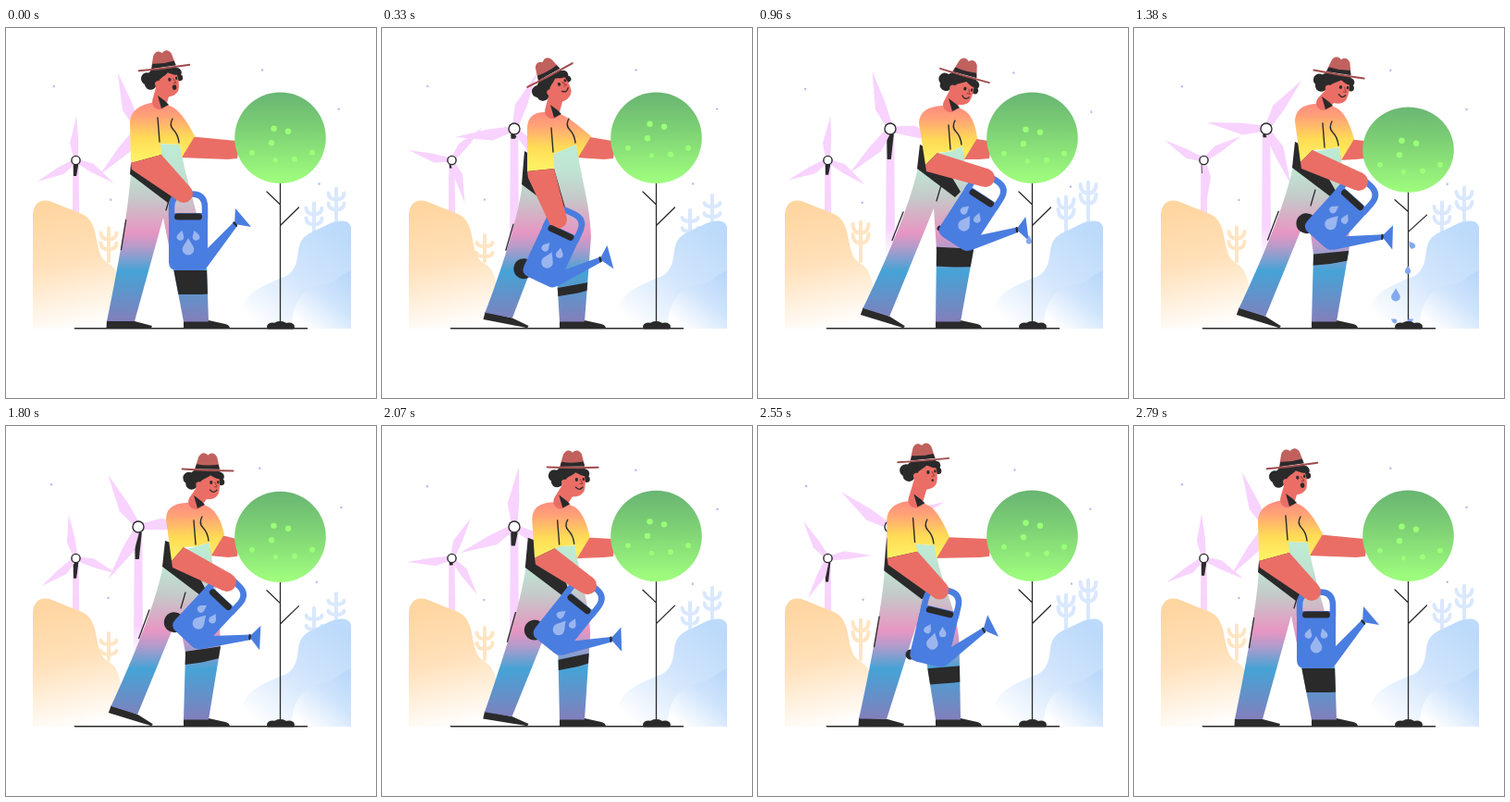
Recreate the animation shown at these times as an HTML page with a canvas. Size 400 by 400 pixels, loop 2820 ms.

```html
<!DOCTYPE html>
<html lang="en">
<head>
<meta charset="utf-8">
<title>Watering a tree</title>
<style>
html, body { margin: 0; height: 100%; overflow: hidden; background: #fff; }
canvas { display: block; width: 400px; height: 400px; }
</style>
</head>
<body>
<canvas id="stage" width="400" height="400"></canvas>
<script>
const c = document.getElementById('stage').getContext('2d');
const LOOP = 2820, STEP = 30, TAU = Math.PI * 2, RAD = Math.PI / 180;
const DARK = '#2a2a2b', SKIN = '#ea6e66', BLUE = '#4a7de0', MILL = '#f8d3ff';

// Pose times; each track returns to its first value at the last one.
const KEYS = [0, 330, 960, 1380, 1800, 2310, 2790];
const points = {
  neck: [168,82, 186,92, 210,85, 207,83, 207,84, 181,83],
  shoulder: [134,91, 157,97, 174,91, 174,89, 173,89, 149,89],
  elbow: [135,146, 157,155, 181,148, 180,145, 179,146, 149,140],
  inner: [168,137, 186,152, 194,135, 193,132, 192,131, 180,134],
  hand: [192,179, 190,207, 246,162, 243,166, 239,169, 205,175],
  farElbow: [197,128, 219,128, 230,130, 231,131, 229,128, 206,134],
  bib: [167,125, 186,136, 209,133, 207,131, 206,130, 178,130],
  hip: [135,156, 152,167, 173,150, 172,149, 170,150, 142,152],
  crotch: [170,205, 176,222, 190,195, 188,200, 186,205, 174,225],
  frontKnee: [217,258, 226,226, 233,240, 233,236, 232,238, 219,213],
  backKnee: [181,260, 189,268, 193,240, 194,245, 194,245, 186,255],
  hat: [171,43, 181.5,51, 223.5,51.5, 221.5,50, 218,47.5, 192,43],
  can: [197,231, 182,246, 227,206.5, 218,206, 213.5,207.5, 183.5,221]
};
const values = {
  headTurn: [-8, -29, 15, 8.5, 1, -2],
  canTurn: [0, 25, 33, 42, 43, 31],
  footTurn: [0, 11, 17, 17, 17, 2],
  patchL: [262, 283, 236, 246, 246, 263],
  patchR: [262, 272, 239, 240, 237, 250],
  patchH: [26, 9, 21, 12, 14, 9],
  cuff: [0, 11, 3, 11, 11, 11],
  bob: [0, 0, 0, 12.5, 1, 0],
  fruit: [0, -5, 1, 0, -2, -8],
  gasp: [1, 0, 0, 0, 0, 0]
};

// Monotone cubic through the keyed values.
function at(track, t) {
  const v = [...track, track[0]];
  if (t >= KEYS[6]) return v[6];
  const slope = i => (v[i + 1] - v[i]) / (KEYS[i + 1] - KEYS[i]);
  const tangent = i => {
    if (i === 0 || i === 6) return 0;
    const a = slope(i - 1), b = slope(i);
    return a * b <= 0 ? 0 : 2 * a * b / (a + b);
  };
  const i = KEYS.findIndex((k, n) => t < KEYS[n + 1]);
  const h = KEYS[i + 1] - KEYS[i], u = (t - KEYS[i]) / h, w = 1 - u;
  return v[i] * (1 + 2 * u) * w * w + v[i + 1] * u * u * (3 - 2 * u)
    + h * (tangent(i) * u * w * w - tangent(i + 1) * u * u * w);
}

function poseAt(t) {
  const p = {};
  for (const k in points)
    p[k] = [0, 1].map(d => at(points[k].filter((_, i) => i % 2 === d), t));
  for (const k in values) p[k] = at(values[k], t);
  if (t > 2310 && t < 2790) p.hat[1] -= 6 * Math.sin((t - 2310) / 480 * Math.PI) ** 2;
  return p;
}

const off = (p, x, y) => [p[0] + x, p[1] + y];
function fade(x0, y0, x1, y1, ...stops) {
  const g = c.createLinearGradient(x0, y0, x1, y1);
  for (let i = 0; i < stops.length; i += 2) g.addColorStop(stops[i], stops[i + 1]);
  return g;
}
function fill(color, d) { c.fillStyle = color; c.fill(new Path2D(d)); }
function line(color, width, d) {
  c.strokeStyle = color;
  c.lineWidth = width;
  c.stroke(new Path2D(d));
}
const poly = (color, ...pts) => fill(color, 'M' + pts.join('L') + 'Z');
function dot(color, x, y, r, ry = r) {
  c.fillStyle = color;
  c.beginPath();
  c.ellipse(x, y, r, ry, 0, 0, TAU);
  c.fill();
}
function within(x, y, deg, draw) {
  c.save();
  c.translate(x, y);
  c.rotate(deg * RAD);
  draw();
  c.restore();
}
function drop(color, x, y, s, deg = 0) {
  within(x, y, deg, () => fill(color,
    `M0 ${-s}C${s * .3} ${-s * .4} ${s * .7} 0 ${s * .7} ${s * .35}` +
    `A${s * .7} ${s * .7} 0 0 1 ${-s * .7} ${s * .35}C${-s * .7} 0 ${-s * .3} ${-s * .4} 0 ${-s}Z`));
}

function windmill(x, y, len, phase, bottom, hub) {
  const w = len * .065;
  poly(fade(0, y, 0, bottom, 0, MILL, .75, MILL, 1, '#f8d3ff00'),
    [x - w, y], [x + w, y], [x + w * 1.2, bottom], [x - w * 1.2, bottom]);
  const shade = len / 65 * (16 + 13 * Math.cos((phase - 92) * 3 * RAD));
  poly(DARK, [x - w * .9, y + hub], [x + w * .9, y + hub],
    [x + w * .2, y + hub + shade], [x - w * .8, y + hub + shade]);
  for (let k = 0; k < 3; k++) within(x, y, phase + k * 120, () => fill(MILL,
    `M${len * .05} 0L${len * .05} ${-len * .45}L0 ${-len}L${-len * .14} ${-len * .38}L${-len * .04} 0Z`));
  dot(DARK, x, y, hub + .7);
  dot('#fff', x, y, hub - .7);
}

function plant(color, x, low, bottom, open) {
  const top = low - 15 * open;
  line(color, 4, `M${x} ${bottom}V${top}`);
  for (const y of [top + 9, top + 20]) for (const s of [-1, 1])
    line(color, 4, `M${x} ${y + 3}Q${x + s * 8} ${y + 3} ${x + s * 8.5} ${y - 1 - 6 * open}`);
}

function scenery(t) {
  const a = t / 1410 * TAU, open = .5 - .5 * Math.sin(a), spin = t / LOOP * 360;
  const r = 1.8, dx = r * Math.cos(-.8 - a), dy = r * Math.sin(-.8 - a);
  for (const [x, y, m] of [[50.5, 64.3, 1], [275.8, 46.8, 1], [361, 89, -1], [337.3, 169.8, 1], [112, 187, 1]])
    dot('#aebff0', x + m * dx, y + dy, 1.2);

  windmill(143, 109, 65, spin - 20, 250, 6);
  windmill(75.5, 143, 48, spin + 1, 215, 4.6);

  plant('#ffe5c3', 111, 224, 252, open);
  plant('#d9e8fd', 333, 197, 225, open);
  plant('#d9e8fd', 357, 181, 214, open);
  fill(fade(55, 190, 85, 325, 0, '#ffd5a0', .45, '#ffe0b8', 1, '#fff'),
    'M29 325V203C29 188 40 183 52 189L82 201C102 210 94 236 106 251C116 259 122 258 126 290L130 325Z');
  fill(fade(360, 220, 275, 325, 0, '#bcdafb', .5, '#d3e6fc', 1, '#fff'),
    'M373 325V216C372 207 361 207 351 211L328 222C308 233 323 252 305 267C282 278 263 281 254 305L246 325Z');
  fill(fade(372, 268, 325, 325, 0, '#b9d8fb', .45, '#cfe4fc', 1, '#fff'),
    'M373 325V262C361 266 357 275 343 278C322 282 311 292 308 325Z');
}

function tree(p) {
  const b = p.bob, y = 118.8 + b * 1.03;
  line(DARK, 1.3, `M296.5 ${150 + b * .85}V320M296.5 ${191 + b * .6}L282 ${177 + b * .7}` +
    `M296.5 ${213.5 + b * .55}L316.5 ${194 + b * .65}`);
  dot(fade(0, y - 49, 0, y + 49, 0, '#69b573', .4, '#7dd074', 1, '#a0ff7e'),
    296.5, y, 49.3, 49.3 - b * .25);
  for (const [dx, dy, r] of [[-7, -10, 3.2], [8.5, -7, 3.2], [-9.5, 5.5, 3.2],
    [-30.5, 16, 2.8], [-5, 24, 2.6], [15.5, 23, 3], [34.5, 16, 3]])
    dot('#9bff78', 296.5 + dx, y + dy + p.fruit, r);
}

function ground() {
  dot(DARK, 288, 323, 6, 4.5);
  dot(DARK, 296.5, 322, 8, 5);
  dot(DARK, 306, 323, 6, 4.5);
  fill('#fff', 'M278 325.5H316V330H278Z');
  line(DARK, 1.6, 'M74.5 324.7H325.5');
}

function head(p) {
  within(...p.hat, p.headTurn, () => {
    for (const [x, y, r] of [[-20, 9, 6.5], [-17, 15, 6.5], [-11, 8, 8], [13, 7, 5], [15, 13, 3.5]])
      dot(DARK, x, y, r);
    fill(SKIN, 'M-11 6H12C14 13 14 20 12 26C8 33 -3 34 -9 27C-13 22 -13 12 -11 6Z');
    fill(DARK, 'M-14 0H13L15 9C10 11 7 7 3 6C-2 10 -7 10 -9 16C-15 15 -15 7 -14 0Z');
    dot(SKIN, -9, 16, 3);
    dot(DARK, 4, 13.5, 1.6, 2);
    dot(DARK, 11.5, 13, 1.2, 1.7);
    line('#9e3f42', 1, 'M8 13L10.5 18H7.5');
    if (p.gasp > .4) dot(DARK, 8, 22.5, 2.3 * p.gasp, 2.8 * p.gasp);
    else line(DARK, 1.3, 'M3 21.5Q7 26 10.5 21.5');
    fill('#c0615e', 'M-14 -1L-10 -14C-8 -18 -4 -20 0 -16C4 -20 8 -18 10 -14L13 -1Z');
    fill(DARK, 'M-13.5 -1L-12 -6Q0 -4 11.5 -6L13 -1Z');
    line('#a04c4c', 2, 'M-27.5 -.5Q0 1 27.5 .5');
  });
}

function trousers(p) {
  const turn = p.footTurn * RAD, cos = Math.cos(turn), sin = Math.sin(turn);
  const foot = (x, y) => [158 + x * cos - y * sin, 325 + x * sin + y * cos];
  const heel = foot(-49, -8), ankle = foot(-19, -8), [hx, hy] = p.hip;
  const bibR = off(p.farElbow, -9, -2);
  poly(DARK, foot(-49, -9), foot(-49.5, -.5), foot(-1, -.5), foot(0, -3), ankle);
  fill(DARK, 'M192 316V325H242Q242 321 237 320L219 316Z');

  const shape = new Path2D(`M${p.bib}L${hx + 8} ${hy - 12}L${p.hip}` +
    `Q${hx * .8 + heel[0] * .2 + 2} ${hy + 50} ${heel}L${ankle}L${p.crotch}` +
    `L${p.backKnee}L192 317.5H219L${p.frontKnee}` +
    `C${off(p.frontKnee, -1, -35)} ${off(bibR, 6, 40)} ${bibR}Z`);
  c.fillStyle = fade(0, 130, 0, 320, 0, '#bdebd4', .14, '#c0e2d2', .28, '#c5c9c9',
    .48, '#e796c2', .56, '#b79bca', .7, '#45a3d6', 1, '#857dba');
  c.fill(shape);
  c.save();
  c.clip(shape);
  poly(DARK, [179, p.patchL], [240, p.patchR], [240, p.patchR + p.patchH - 2],
    [212, (p.patchL + p.patchR) / 2 + p.patchH], [179, p.patchL + p.patchH]);
  c.restore();

  const seam = u => [hx + (heel[0] - hx) * u + 3, hy + (heel[1] - hy) * u];
  line(DARK, 1.3, `M${seam(.32)}L${seam(.52)}M${off(p.crotch, 8, -25)}L${off(p.crotch, 3, -8)}`);
  poly(DARK, [hx + 2, p.elbow[1] - 22], off(p.hip, -1, 2), off(p.hip, 40, 33),
    off(p.hip, 46, 27), p.inner);
  return bibR;
}

function shirt(p, bibR) {
  const [nx, ny] = p.neck, e = p.farElbow, s = p.shoulder;
  const yellow = fade(0, ny - 2, 0, ny + 58, 0, '#ff8b80', .25, '#ffa277', .65, '#ffdc55', 1, '#fff063');
  fill(yellow, `M${nx - 12} ${ny - 1}Q${s[0]} ${s[1] - 5} ${off(s, 0, 12)}L${p.elbow}L${p.inner}` +
    `L${p.bib}L${bibR}L${off(e, -7, 12)}L${off(e, 7, -11)}` +
    `Q${nx + 24} ${ny + 11} ${nx + 13} ${ny + 4}Q${nx} ${ny - 3} ${nx - 12} ${ny - 1}Z`);
  line(DARK, 1.4, `M${off(p.bib, -3, -28)}L${off(p.bib, -1, -2)}` +
    `M${off(bibR, -8, -28)}q-4 7 1 12t6 14`);
}

function can(p) {
  within(...p.can, p.canTurn, () => {
    if (p.cuff > .5) dot(DARK, -20, 25, p.cuff);
    line(BLUE, 6.5, 'M-18 -26V-37Q-18 -51.5 -4 -51.5H4Q18 -51.5 18 -37V-26');
    fill(BLUE, 'M-21 -31H21V22Q21 31 12 31H-12Q-21 31 -21 22Z');
    fill(BLUE, 'M20 8L49 -21L53 -17L20 28Z');
    poly(BLUE, [50, -19], [51, -36], [68, -16]);
    line(DARK, 2.4, 'M49.5 -20.5L52 -17.5');
    const pale = '#9bb6ef';
    drop(pale, -8, -7, 5.5, 15);
    drop(pale, 8, -7, 5.5, -15);
    drop(pale, 0, 5, 9);
  });
}

function nearArm(p) {
  const [ax, ay] = p.elbow, [bx, by] = p.inner, [x, y] = p.hand;
  const dir = Math.atan2(y - (ay + by) / 2, x - (ax + bx) / 2);
  const nx = Math.sin(dir) * 10, ny = -Math.cos(dir) * 10;
  poly(SKIN, p.elbow, p.inner, [x + nx, y + ny], [x - nx, y - ny], off(p.elbow, 1, 7));
  dot(SKIN, x, y, 10);
  within(...p.can, p.canTurn, () => line(DARK, 7, 'M-11.5 -27H11.5'));
}

function person(p) {
  poly(SKIN, off(p.farElbow, 0, -11), [249, 122], [252, 128], [250, 141],
    [240, 142], off(p.farElbow, -10, 12));
  const bibR = trousers(p);
  shirt(p, bibR);
  const a = p.headTurn * RAD, [x, y] = p.hat;
  const throat = [x - 4 * Math.cos(a) - 22 * Math.sin(a), y - 4 * Math.sin(a) + 22 * Math.cos(a)];
  line(SKIN, 16, `M${throat}L${off(p.neck, -2, -2)}`);
  poly(DARK, off(p.neck, -4, -9), off(p.neck, 4, -3), off(p.neck, 8, 1), off(p.neck, 0, 5));
  head(p);
  can(p);
  nearArm(p);
}

function water(t) {
  [293, 290, 283, 296, 300].forEach((x, n) => {
    const age = t - 920 - n * 100, y = 218 + age * .27;
    if (age < 0 || age > 450) return;
    if (y < 313) drop('#85a9ee', x, y, n === 2 ? 7 : 4.5, n === 4 ? -35 : 0);
    else {
      const u = (age - 350) / 100, lift = 9 * Math.sin(Math.PI * u);
      for (const s of [-1, 1]) drop('#85a9ee', 290 + s * (8 + 12 * u), 319 - lift, 3.5, s * 60);
    }
  });
}

function frame(now) {
  const t = Math.floor(now % LOOP / STEP) * STEP, p = poseAt(t);
  c.clearRect(0, 0, 400, 400);
  c.lineCap = c.lineJoin = 'round';
  scenery(t);
  person(p);
  tree(p);
  water(t);
  ground();
}

let start;
function tick(now) {
  start ??= now;
  frame(now - start);
  requestAnimationFrame(tick);
}
frame(0);
requestAnimationFrame(tick);
</script>
</body>
</html>
```
